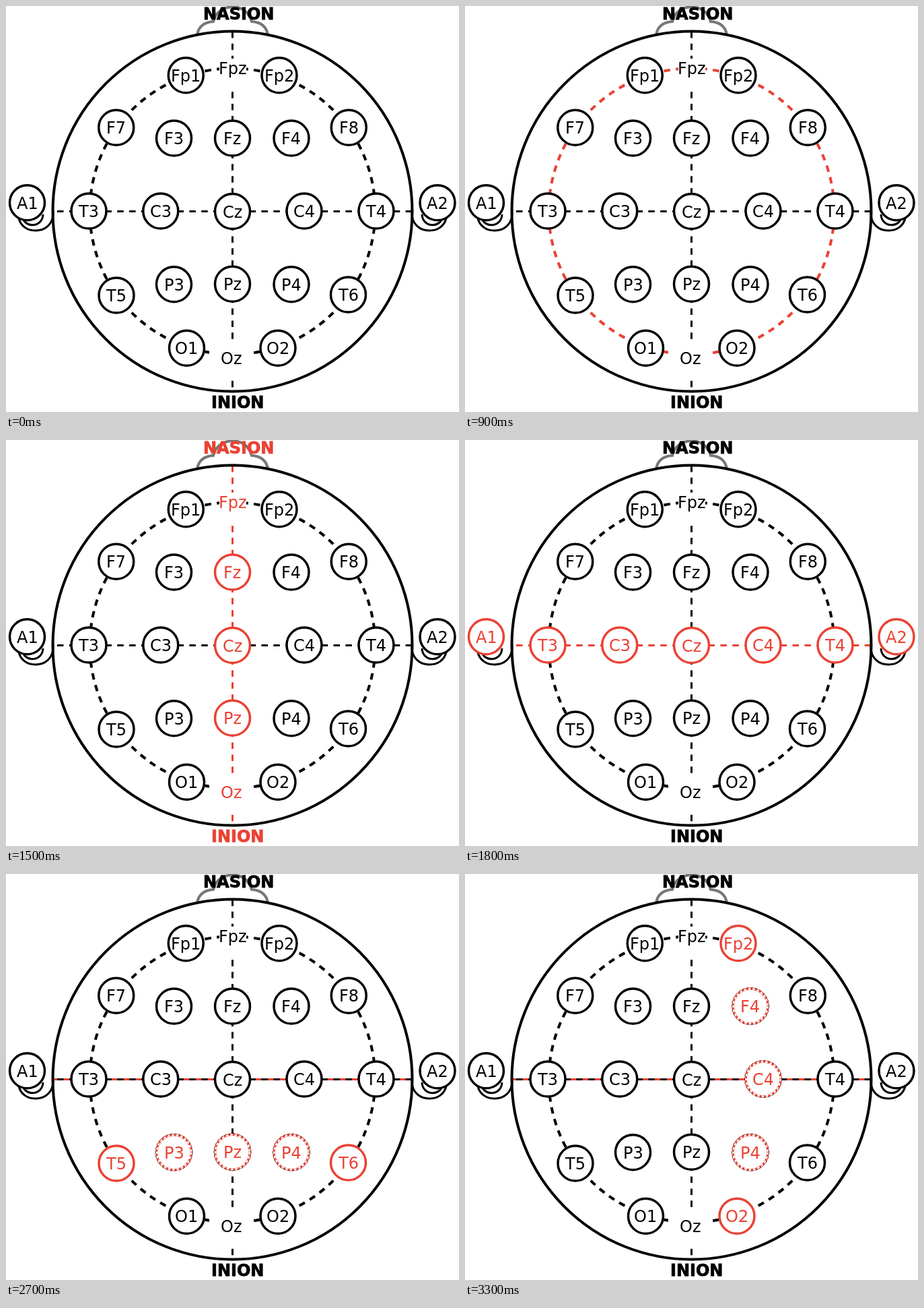
Write an HTML page with a canvas that moves like this. It is 673x602 px and loops after 3600 ms.

```html
<!DOCTYPE html>
<html lang="en">
<head>
<meta charset="utf-8">
<style>
  html, body { margin: 0; width: 100%; height: 100%; overflow: hidden; background: #fff; }
  canvas { display: block; }
</style>
</head>
<body>
<canvas id="stage" width="673" height="602"></canvas>
<script>
const ctx = document.getElementById('stage').getContext('2d');
const BLACK = '#000', RED = '#ea4234', WHITE = '#fff';
const CX = 336.5, CY = 304.5;
const DASH = [9.5, 8.35];
const STEP = 300;

const electrodes = {
  Fp1: [267.25, 102.75], Fp2: [406, 102.75],
  F7: [163.75, 180.25], F3: [249.5, 196], Fz: [336.5, 196], F4: [424, 196], F8: [509.25, 180.25],
  A1: [31.5, 291.75], T3: [123, 304], C3: [229.75, 304], Cz: [336.5, 304.5],
  C4: [443, 304], T4: [550, 304], A2: [641, 291.75],
  T5: [164, 429], P3: [249.5, 412.75], Pz: [336.5, 412.25], P4: [424, 412.75], T6: [508.5, 428],
  O1: [268.5, 507.25], O2: [404, 507.25]
};

// Each step lists its highlighted parts; "dotted" electrodes get a beaded outline.
const steps = [
  {},
  { lit: 'ring' },
  { lit: 'head' },
  { lit: 'ring' },
  { lit: 'head' },
  { lit: 'midline NASION Fpz Fz Cz Pz Oz INION' },
  { lit: 'crossline A1 T3 C3 Cz C4 T4 A2' },
  {},
  { lit: 'F7 F8', dotted: 'F3 Fz F4', redGaps: true },
  { lit: 'T5 T6', dotted: 'P3 Pz P4', redGaps: true },
  { lit: 'Fp1 O1', dotted: 'F3 C3 P3', redGaps: true },
  { lit: 'Fp2 O2', dotted: 'F4 C4 P4', redGaps: true }
].map(({ lit = '', dotted = '', redGaps = false }) =>
  ({ lit: new Set(lit.split(' ')), dotted: new Set(dotted.split(' ')), redGaps }));

function stroke(path, color, width, dash = [], offset = 0) {
  ctx.strokeStyle = color;
  ctx.lineWidth = width;
  ctx.setLineDash(dash);
  ctx.lineDashOffset = offset;
  ctx.stroke(path);
}

function circle(x, y, r) {
  const path = new Path2D();
  path.arc(x, y, r, 0, Math.PI * 2);
  return path;
}

// Text starts on whole pixels to keep its stems crisp.
function label(text, x, baseline, color, bold = false) {
  ctx.font = `${bold ? 'bold' : 'normal'} 24px "DejaVu Sans", sans-serif`;
  ctx.fillStyle = ctx.strokeStyle = color;
  const left = Math.round(x - ctx.measureText(text).width / 2);
  ctx.fillText(text, left, Math.round(baseline));
  if (!bold) return;
  ctx.lineWidth = 0.8;
  ctx.setLineDash([]);
  ctx.strokeText(text, left, Math.round(baseline));
}

const nose = new Path2D('M284 43C286 30 294 24 308 23C312 8 322 2 337 1C352 2 361 10 365 23C379 24 387 30 389 43');
const ear = new Path2D('M70 302V309C69 324 58 333 44 333C31 333 22 326 19 315M25 314C28 329 54 329 55 309');
const midline = new Path2D('M336.5 38V572');
const crossline = new Path2D('M71 304.5H602');
const head = circle(CX, CY, 267);
const quarterRing = new Path2D();
quarterRing.arc(0, 0, 212, Math.PI, Math.PI * 1.5);

function drawRing(color) {
  for (const sx of [1, -1]) for (const sy of [1, -1]) {
    ctx.save();
    ctx.translate(CX, CY);
    ctx.scale(sx, sy);
    stroke(quarterRing, color, 4, DASH, -6);
    ctx.restore();
  }
}

function drawEars() {
  stroke(ear, BLACK, 3);
  ctx.save();
  ctx.translate(673, 0);
  ctx.scale(-1, 1);
  stroke(ear, BLACK, 3);
  ctx.restore();
}

function drawElectrode(name, color, dotted) {
  const [x, y] = electrodes[name];
  const outline = circle(x, y, 26);
  ctx.fillStyle = WHITE;
  ctx.fill(outline);
  stroke(outline, color, 3.5);
  if (dotted) {
    stroke(circle(x, y, 25.7), WHITE, 2.4, [3.5, 3]);
    stroke(circle(x, y, 27.5), BLACK, 0.6, [3.5, 3]);
  }
  label(name, x, y + 9, color);
}

function draw({ lit, dotted, redGaps }) {
  const colorOf = part => lit.has(part) || dotted.has(part) ? RED : BLACK;
  ctx.fillStyle = WHITE;
  ctx.fillRect(0, 0, 673, 602);

  stroke(nose, '#777', 4);
  drawEars();
  drawRing(colorOf('ring'));
  stroke(midline, colorOf('midline'), 3, DASH);
  if (redGaps) stroke(crossline, RED, 3);
  stroke(crossline, colorOf('crossline'), 3, DASH, -5);
  stroke(head, BLACK, 4);
  if (lit.has('head')) stroke(head, RED, 3);

  ctx.fillStyle = WHITE;
  ctx.fillRect(317, 78, 40, 49);
  ctx.fillRect(302, 500, 60, 48);
  label('Fpz', 336.5, 101, colorOf('Fpz'));
  label('Oz', 335, 531, colorOf('Oz'));
  label('NASION', 345.5, 20, colorOf('NASION'), true);
  label('INION', 344, 596, colorOf('INION'), true);
  for (const name in electrodes) drawElectrode(name, colorOf(name), dotted.has(name));
}

function tick() {
  draw(steps[Math.floor(performance.now() / STEP) % steps.length]);
  requestAnimationFrame(tick);
}
tick();
</script>
</body>
</html>
```
